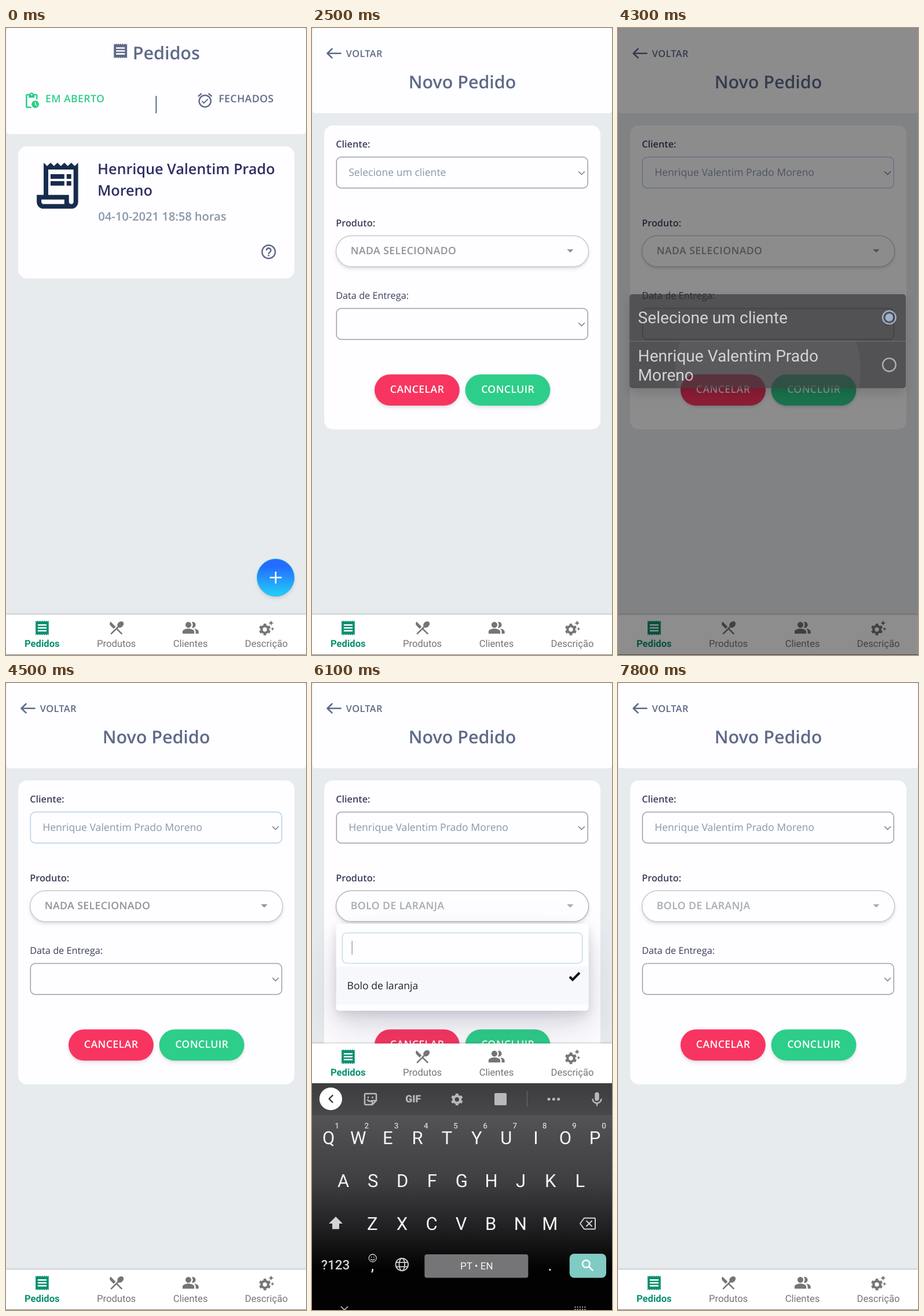
Recreate the animation shown at these times as an HTML page. Size 518x1081 px, loop 8 s.

```html
<!DOCTYPE html>
<html lang="pt">
<head>
<meta charset="utf-8">
<title>Pedidos</title>
<style>
  html, body { margin: 0; width: 100%; height: 100%; overflow: hidden; background: #e7ebee; }
  svg { display: block; width: 100vw; height: 100vh; }
  text { font-family: "Open Sans", sans-serif; text-rendering: geometricPrecision; white-space: pre; }
  .sb { font-weight: 600; }
  .caps { font-weight: 600; font-size: 17.6px; letter-spacing: .44px; }
  .label { font-size: 16.3px; fill: #3a3f5c; }
  .field { font-size: 17.6px; fill: #8898aa; }
  .title { font-weight: 600; font-size: 30.4px; fill: #5e6a88; }
  .mid { text-anchor: middle; }
  .rb, .rb text { font-family: Roboto, sans-serif; }
  .box { fill: #fefdff; stroke: #9b9fa6; stroke-width: 1.5; }
  .raised { filter: drop-shadow(0 4px 3px rgba(50,50,93,.11)) drop-shadow(0 1px 1.5px rgba(0,0,0,.08)); }
  .floating {
    filter: drop-shadow(0 18px 20px rgba(50,50,93,.14)) drop-shadow(0 5px 8px rgba(0,0,0,.1))
      drop-shadow(0 50px 50px rgba(50,50,93,.08));
  }
  .line { fill: none; stroke-linecap: round; stroke-linejoin: round; }
</style>
</head>
<body>
<svg id="stage" viewBox="0 0 518 1081" preserveAspectRatio="none"></svg>
<script>
const LOOP = 8000, STEP = 100;
const NAME = ["Henrique Valentim Prado", "Moreno"];
const PAPER = "#fefdff", SLATE = "#5e6a88", GREEN = "#2dce89", GREY = "#757575", TEAL = "#0a9070";

// Icons on a 24 unit grid
const ICON = {
  receipt: "M18 17H6v-2h12v2zm0-4H6v-2h12v2zm0-4H6V7h12v2zM3 22l1.5-1.5L6 22l1.5-1.5L9 22l1.5-1.5L12 22l1.5-1.5L15 22l1.5-1.5L18 22l1.5-1.5L21 22V2l-1.5 1.5L18 2l-1.5 1.5L15 2l-1.5 1.5L12 2l-1.5 1.5L9 2 7.5 3.5 6 2 4.5 3.5 3 2z",
  cutlery: "M8.1 13.34l2.83-2.83L3.91 3.5c-1.56 1.56-1.56 4.09 0 5.66l4.19 4.18zm6.78-1.81c1.53.71 3.68.21 5.27-1.38 1.91-1.91 2.28-4.65.81-6.12-1.46-1.46-4.2-1.1-6.12.81-1.59 1.59-2.09 3.74-1.38 5.27L3.7 19.87l1.41 1.41L12 14.41l6.88 6.88 1.41-1.41L13.41 13l1.47-1.47z",
  people: "M16.67 13.13C18.04 14.06 19 15.32 19 17v3h4v-3c0-2.18-3.57-3.47-6.33-3.87zM15 12c2.21 0 4-1.79 4-4s-1.79-4-4-4c-.47 0-.91.1-1.33.24C14.5 5.27 15 6.58 15 8s-.5 2.73-1.33 3.76c.42.14.86.24 1.33.24zM9 12c2.21 0 4-1.79 4-4s-1.79-4-4-4-4 1.79-4 4 1.79 4 4 4zm0 1c-2.67 0-8 1.34-8 4v3h16v-3c0-2.66-5.33-4-8-4z",
  sparks: "M17.41 6.59L15 5.5l2.41-1.09L18.5 2l1.09 2.41L22 5.5l-2.41 1.09L18.5 9zM21.28 12.72L20.5 11l-.78 1.72-1.72.78 1.72.78.78 1.72.78-1.72L23 13.5z",
  pending: "M17 12c-2.76 0-5 2.24-5 5s2.24 5 5 5 5-2.24 5-5-2.24-5-5-5zm1.65 7.35L16.5 17.2V14h1v2.79l1.85 1.85-.7.71zM18 3h-3.18C14.4 1.84 13.3 1 12 1s-2.4.84-2.82 2H6c-1.1 0-2 .9-2 2v15c0 1.1.9 2 2 2h6.11c-.59-.57-1.07-1.25-1.42-2H6V5h2v3h8V5h2v5.08c.71.1 1.38.31 2 .6V5c0-1.1-.9-2-2-2zm-6 2c-.55 0-1-.45-1-1s.45-1 1-1 1 .45 1 1-.45 1-1 1z",
  alarm: "M22 5.72l-4.6-3.86-1.29 1.53 4.6 3.86L22 5.72zM7.88 3.39L6.6 1.86 2 5.71l1.29 1.53 4.59-3.85zM12 4c-4.97 0-9 4.03-9 9s4.02 9 9 9c4.97 0 9-4.03 9-9s-4.03-9-9-9zm0 16c-3.87 0-7-3.13-7-7s3.13-7 7-7 7 3.13 7 7-3.13 7-7 7zm-1.46-5.47L8.41 12.4l-1.06 1.06 3.18 3.18 6-6-1.06-1.06-4.93 4.95z",
  help: "M11 18h2v-2h-2v2zm1-16C6.48 2 2 6.48 2 12s4.48 10 10 10 10-4.48 10-10S17.52 2 12 2zm0 18c-4.41 0-8-3.59-8-8s3.59-8 8-8 8 3.59 8 8-3.59 8-8 8zm0-14c-2.21 0-4 1.79-4 4h2c0-1.1.9-2 2-2s2 .9 2 2c0 2-3 1.75-3 5h2c0-2.25 3-2.5 3-5 0-2.21-1.79-4-4-4z",
  scroll: "M19.5 3.5L18 2l-1.5 1.5L15 2l-1.5 1.5L12 2l-1.5 1.5L9 2 7.5 3.5 6 2v14H3v3c0 1.66 1.34 3 3 3h12c1.66 0 3-1.34 3-3V2l-1.5 1.5zM15 20H6c-.55 0-1-.45-1-1v-1h10v2zm4-1c0 .55-.45 1-1 1s-1-.45-1-1v-3H8V5h11v14zM9 7h6v2H9zM16 7h2v2h-2zM9 10h6v2H9zM16 10h2v2h-2z",
  mic: "M12 14c1.66 0 3-1.34 3-3V5c0-1.66-1.34-3-3-3S9 3.34 9 5v6c0 1.66 1.34 3 3 3zm5-3c0 2.76-2.24 5-5 5s-5-2.24-5-5H5c0 3.53 2.61 6.43 6 6.92V21h2v-3.08c3.39-.49 6-3.39 6-6.92z"
};

const text = (x, y, s, cls = "", attr = "") => `<text x="${x}" y="${y}" class="${cls}" ${attr}>${s}</text>`;
const rect = (x, y, w, h, rx, attr) => `<rect x="${x}" y="${y}" width="${w}" height="${h}" rx="${rx}" ${attr}/>`;
const circle = (x, y, r, attr) => `<circle cx="${x}" cy="${y}" r="${r}" ${attr}/>`;
const line = (d, color, w = 2) => `<path class="line" d="${d}" stroke="${color}" stroke-width="${w}"/>`;
const icon = (name, x, y, color, s = 1.26) =>
  `<path transform="translate(${x} ${y}) scale(${s})" d="${ICON[name]}" fill="${color}"/>`;
const gear = (x, y, color, s = 1.26) =>
  `<g transform="translate(${x} ${y}) scale(${s})" fill="none" stroke="${color}">` +
  circle(0, 0, 4.6, 'stroke-width="3.4"') +
  circle(0, 0, 6.9, 'stroke-width="2.4" pathLength="12" stroke-dasharray="1 1" stroke-dashoffset="1.5"') + "</g>";
const group = (id, body, attr = "") => `<g id="${id}" ${attr}>${body}</g>`;
const header = h => rect(.7, 0, 517.3, h, 5, `fill="${PAPER}"`);

const ordersPage = () => header(183) +
  icon("receipt", 182.4, 24.3, SLATE, 1.27) + text(218.8, 54, "Pedidos", "title") +
  icon("pending", 29, 110, GREEN, 1.27) + text(68, 127.9, "EM ABERTO", "caps", `fill="${GREEN}"`) +
  rect(258.3, 117, 2, 30, 0, `fill="${SLATE}"`) +
  icon("alarm", 328.5, 109.7, SLATE) + text(367.3, 127.9, "FECHADOS", "caps", `fill="${SLATE}"`) +
  rect(21, 204, 477, 228, 15, `fill="${PAPER}"`) +
  icon("scroll", 41.2, 224.2, "#172b4d", 3.97) +
  NAME.map((s, i) => text(158, 251.5 + 37.6 * i, s, "sb", 'font-size="25.2" fill="#2c2e63"')).join("") +
  text(159.3, 332, "04-10-2021 18:58 horas", "sb", 'font-size="20.1" fill="#8898aa"') +
  icon("help", 438.4, 370.8, SLATE) +
  circle(465.6, 947.5, 32.1, 'fill="url(#fab)" stroke="#22b6ea" class="raised"') +
  line("M456.5 947.5h18.5M465.7 938.2v18.5", "#fff", 2.6);

const selectBox = (y, id) => rect(42.3, y, 433.9, 53.3, 8, `class="box" id="${id}"`) +
  line(`M460.5 ${y + 25}l5 5l5 -5`, "#868a92", 1.5);
const button = (x, color, s) => rect(x, 597.3, 146.8, 53.7, 26.8, `fill="${color}" class="raised"`) +
  text(x + 73.6, 629.4, s, "caps mid", 'fill="#fff"');

const formPage = () => header(147) +
  line("M49.5 43.7H27M34.5 36l-8 7.7l8 7.7", SLATE, 2.6) +
  text(58.8, 49.6, "VOLTAR", "sb", `font-size="16.3" letter-spacing=".4" fill="${SLATE}"`) +
  text(259.5, 104, "Novo Pedido", "title mid") +
  rect(21, 168, 477, 524, 15, `fill="${PAPER}"`) +
  text(41.2, 206, "Cliente:", "label sb") + selectBox(222.6, "clientBox") +
  text(63.2, 255.2, "", "field", 'id="client"') +
  text(41.2, 342, "Produto:", "label sb") +
  text(41.2, 467.2, "Data de Entrega:", "label") + selectBox(483.6, "dateBox") +
  button(108, "#f83560", "CANCELAR") + button(264.6, GREEN, "CONCLUIR") +
  group("pill",
    rect(41.6, 358.2, 436, 53.2, 26.6, `id="pillBox" fill="${PAPER}" stroke-width="1.2" class="raised"`) +
    text(66.8, 390, "", "caps", 'id="product"') +
    `<path id="pillCaret" d="M440.2 381.5h11.3l-5.65 5.7z"/>`) +
  group("drop",
    rect(41.6, 415, 436, 150, 5, `fill="${PAPER}" class="floating"`) +
    rect(52.3, 430.7, 414.6, 52.6, 8, `fill="${PAPER}" stroke="#c3e2e6" stroke-width="1.6"`) +
    rect(68.6, 444.5, 1.2, 24, 0, 'id="cursor" fill="#8f9094"') +
    group("chosen", rect(41.6, 489, 436, 65.5, 0, 'fill="#f6f8fc"') +
      `<path d="M445 506.5l5 5.2l12 -12.2" fill="none" stroke="#111" stroke-width="4"/>`) +
    text(60.5, 527.6, "Bolo de laranja", "", 'font-size="17.6" fill="#212529"'));

const tab = (x, s, on) => text(x, 1066.8, s, "mid",
  `font-size="16.6" fill="${on ? TEAL : GREY}" font-weight="${on ? 700 : 400}"`);
const navBar = () => rect(0, 1011.5, 518, 69, 0, 'fill="#fff" style="filter:drop-shadow(0 -1px 1.5px rgba(0,0,0,.2))"') +
  icon("receipt", 47.3, 1019.2, TEAL) + icon("cutlery", 175.6, 1019, GREY) +
  icon("people", 303.6, 1019, GREY) + icon("sparks", 434.4, 1019, GREY) +
  gear(447, 1037, GREY) +
  tab(62.3, "Pedidos", true) + tab(190.6, "Produtos") + tab(318.5, "Clientes") + tab(449.5, "Descrição");

const radio = (y, color, on) => circle(468.3, y, 11.3, `fill="none" stroke="${color}" stroke-width="2.4"`) +
  (on ? circle(468.3, y, 6.8, `fill="${color}"`) : "");
const option = (y, s) => text(34.6, y, s, "", 'font-size="28.1" fill="#fafafc"');
const dialog = () => rect(20, 459, 477, 162, 5, 'fill="#333236" style="filter:drop-shadow(0 8px 9px rgba(0,0,0,.22))"') +
  circle(259, 590, 1, 'id="ripple" fill="#fff" clip-path="url(#row)"') +
  rect(20, 539.4, 477, 1.2, 0, 'fill="#5d5c61"') +
  option(509.3, "Selecione um cliente") + option(575.2, NAME[0]) + option(608.2, NAME[1]) +
  radio(499, "#a8c7f0", true) + radio(580.7, "#c4c3c8", false);

const keyRow = (s, x, y) => [...s].map((c, i) =>
  text(x + 51.1 * i, y, c, "mid", 'font-size="31" fill="#f5f5f5"')).join("");
const keyboard = () => {
  const ink = "#d2d2d4", face = "#b9b9bb", white = "#f5f5f5";
  const digits = [..."1234567890"].map((c, i) =>
    text(43.2 + 51.2 * i, 768, c, "mid", `font-size="13.5" font-weight="500" fill="${ink}"`)).join("");
  const dots = [0, 1, 2].map(i => circle(409 + 8.3 * i, 717.5, 2.5, `fill="${face}"`)).join("");
  const grid = Array.from({ length: 10 }, (_, i) =>
    rect(453.5 + 4.2 * (i % 5), 1075 + 4 * (i / 5 | 0), 2, 2, 0, 'fill="#aaa"')).join("");
  return rect(0, 690, 518, 391, 0, 'fill="url(#keys)"') + rect(0, 690, 518, 55, 0, 'fill="url(#tools)"') +
    circle(32.4, 717, 19.6, 'fill="#fff"') + line("M35.5 711l-6 6l6 6", "#333", 2.3) +
    line("M93 708h16q2 0 2 2v10l-7 7h-11q-2 0 -2 -2v-15q0 -2 2 -2M111 720h-5q-2 0 -2 2v5M97 714v1M104.5 714v1M96 719q4 4 7 1", face, 2.5) +
    text(174.7, 723, "GIF", "mid", `font-size="17.5" font-weight="900" fill="${face}"`) +
    gear(250.3, 718, face, 1.28) + rect(315, 707, 21, 21, 2, `fill="${face}"`) +
    rect(370.8, 703, 1.2, 28, 0, 'fill="#69696b"') + dots + icon("mic", 477, 703, face, 1.25) +
    digits + keyRow("QWERTYUIOP", 28.7, 795) + keyRow("ASDFGHJKL", 54, 869) + keyRow("ZXCVBNM", 104.3, 943) +
    `<path d="M41 920l12 12h-6v9.5h-12v-9.5h-6z" fill="${ink}"/>` +
    line("M470 922.5h17.5q1.5 0 1.5 1.5v16q0 1.5 -1.5 1.5h-17.5l-7 -9.5zM474 927.5l9 9M483 927.5l-9 9", ink, 2) +
    text(40.7, 1010.5, "?123", "mid", `font-size="22.5" font-weight="500" fill="${ink}"`) +
    circle(104.7, 991.5, 6.5, `fill="none" stroke="${ink}" stroke-width="1.3"`) +
    line("M102.5 989.5v.5M107 989.5v.5M101.5 993.5q3.2 3 6.4 0", ink, 1.3) +
    text(104.5, 1013, ",", "mid", `font-size="27" fill="${white}"`) +
    `<g fill="none" stroke="${ink}" stroke-width="1.8">` + circle(155.3, 1002.6, 10.8, "") +
    `<ellipse cx="155.3" cy="1002.6" rx="4.8" ry="10.8"/><path d="M145.5 998.8h19.6M145.5 1006.4h19.6"/></g>` +
    rect(194.3, 985, 179, 40.5, 4, 'fill="#757577"') +
    text(284.3, 1011, "PT • EN", "mid", `font-size="17" fill="${white}"`) +
    text(411, 1013, ".", "mid", `font-size="28" fill="${white}"`) +
    rect(444.7, 984, 63.3, 41.5, 8, 'fill="#80cbc4"') +
    circle(473.3, 1001.5, 6.3, 'fill="none" stroke="#fff" stroke-width="2.5"') +
    line("M478 1006.2l6.5 6.5", "#fff", 2.6) +
    line("M50.5 1075.5l5.5 5.5l5.5 -5.5", "#aaa", 1.8) + grid;
};

const gradient = (id, ...stops) => `<linearGradient id="${id}" x1="0" y1="0" x2="0" y2="1">` +
  stops.map(([o, c]) => `<stop offset="${o}" stop-color="${c}"/>`).join("") + "</linearGradient>";

document.getElementById("stage").innerHTML = "<defs>" +
  gradient("fab", [.2, "#246cff"], [.97, "#22cdf8"]) +
  gradient("tools", [0, "#3d3d40"], [1, "#48484b"]) +
  gradient("keys", [.14, "#535356"], [.43, "#3f3f42"], [.62, "#232325"], [.82, "#020202"]) +
  `<clipPath id="row">${rect(20, 540, 477, 81, 0, "")}</clipPath></defs>` +
  rect(0, 0, 518, 1081, 0, 'fill="#e7ebee"') +
  group("orders", ordersPage()) + group("form", formPage()) +
  rect(0, 1080, 518, 1, 0, 'fill="#000"') +
  group("nav", navBar(), 'class="rb"') +
  rect(0, 0, 518, 1081, 0, 'id="dim" fill="#000"') + group("dialog", dialog(), 'class="rb"') +
  rect(0, 690, 518, 391, 0, 'id="void" fill="#111012"') + group("keyboard", keyboard(), 'class="rb"');

const el = {};
document.querySelectorAll("[id]").forEach(n => el[n.id] = n);
const ramp = (t, a, b) => Math.min(1, Math.max(0, (t - a) / (b - a)));
const show = (n, on) => n.style.display = on ? "" : "none";
const set = (n, k, v) => n.setAttribute(k, v);
const within = (t, a, b) => t >= a && t < b;

function draw(t) {
  const inForm = t >= 1800, picked = t >= 5800;
  const open = within(t, 5100, 6700), settling = within(t, 5000, 5400);
  show(el.orders, !inForm);
  show(el.form, inForm);

  // Form fields
  const named = t >= 4300;
  el.client.textContent = named ? NAME.join(" ") : "Selecione um cliente";
  set(el.clientBox, "style", within(t, 3200, 5000) ? "stroke:#b4cfe6" : "");
  el.product.textContent = picked ? "BOLO DE LARANJA" : "NADA SELECIONADO";
  const tint = picked ? "#a6acb4" : "#919297";
  set(el.product, "fill", tint);
  set(el.pillCaret, "fill", tint);
  set(el.pillBox, "stroke", within(t, 5000, 6700) ? "#abadb2" : "#c2c4c9");
  set(el.pill, "transform", `translate(0 ${settling ? -1.4 : 0})`);

  // Product list
  show(el.drop, open);
  set(el.drop, "transform", `translate(0 ${settling ? 1.2 : 0})`);
  show(el.chosen, picked);
  show(el.cursor, Math.floor((t - 4900) / 500) % 2 === 0);

  // Client dialog
  const rise = 1 - (1 - ramp(t, 3150, 3400)) ** 2;
  const shown = t < 4200 ? rise : 1 - ramp(t, 4200, 4480);
  set(el.dim, "opacity", .6 * (t < 4200 ? shown : shown ** .66));
  set(el.dialog, "opacity", shown);
  set(el.ripple, "r", 80 + 160 * ramp(t, 4200, 4400));
  set(el.ripple, "opacity", within(t, 4200, 4500) ? .06 : 0);

  // Keyboard slides in over a dark gap, then the tab bar sits on top of it
  const rising = ramp(t, 5100, 5400) ** 1.5, falling = ramp(t, 6650, 6950);
  show(el.void, within(t, 5200, 6700));
  show(el.keyboard, t > 5100 && falling < 1);
  set(el.keyboard, "opacity", rising);
  set(el.keyboard, "transform", `translate(0 ${391 * (1 - rising + falling ** 1.5)})`);
  show(el.nav, !within(t, 5200, 5300));
  set(el.nav, "transform", `translate(0 ${within(t, 5300, 6700) ? -390 : 0})`);
}

const start = performance.now();
function tick() {
  const t = (performance.now() - start) % LOOP;
  draw(Math.floor(t / STEP) * STEP);
  requestAnimationFrame(tick);
}
tick();
</script>
</body>
</html>
```
